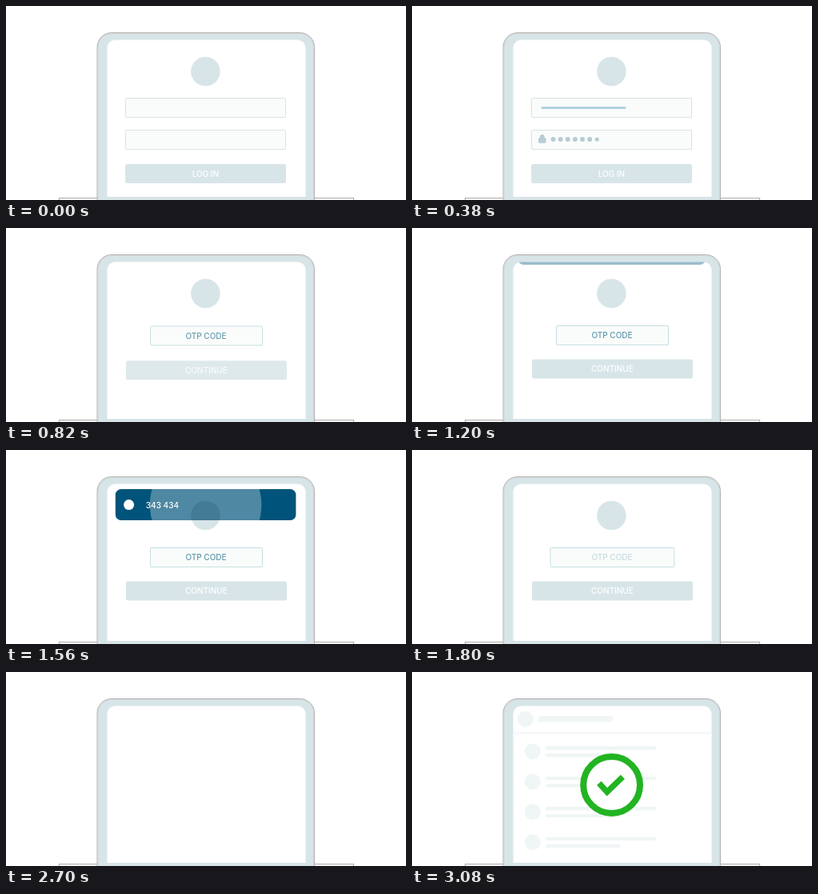
Recreate the animation shown at these times as an HTML page with a canvas. Size 500 by 243 pixels, loop 3260 ms.

```html
<!DOCTYPE html>
<html lang="en">
<head>
<meta charset="utf-8">
<title>Login flow</title>
<style>
html, body { margin: 0; width: 100%; height: 100%; overflow: hidden; background: #fff; }
canvas { display: block; width: 500px; height: 243px; }
</style>
</head>
<body>
<canvas id="stage"></canvas>
<script>
const LOOP = 3260, W = 500, H = 243, CX = 249.8;
const PALE = '#d8e5e8', BLUE = '#0070a6', NAVY = '#00537a', GREEN = '#22b422', GHOST = '#f0f5f6';
const canvas = document.getElementById('stage');
const ctx = canvas.getContext('2d');
const dpr = window.devicePixelRatio || 1;
canvas.width = W * dpr;
canvas.height = H * dpr;

const span = (t, from, to) => Math.min(1, Math.max(0, (t - from) / (to - from)));
const mix = (a, b, k) => a + (b - a) * k;
const easeIn = k => k * k;
const easeOut = k => 1 - (1 - k) ** 3;
const easeBoth = k => k * k * (3 - 2 * k);

function layer(alpha, dy, draw) {
  if (alpha <= 0) return;
  ctx.save();
  ctx.globalAlpha *= alpha;
  ctx.translate(0, dy);
  draw();
  ctx.restore();
}

function box(x, y, w, h, r, fill, stroke) {
  ctx.beginPath();
  ctx.roundRect(x, y, w, h, r);
  if (fill) { ctx.fillStyle = fill; ctx.fill(); }
  if (stroke) { ctx.strokeStyle = stroke; ctx.lineWidth = 1; ctx.stroke(); }
}

function disc(x, y, r, fill) {
  ctx.beginPath();
  ctx.arc(x, y, r, 0, Math.PI * 2);
  ctx.fillStyle = fill;
  ctx.fill();
}

function label(str, x, y, color, { size = 10, weight = 500, align = 'center' } = {}) {
  ctx.font = `${weight} ${size}px Inter, Roboto, sans-serif`;
  ctx.textAlign = align;
  ctx.fillStyle = color;
  ctx.fillText(str, x, y);
}

// Expanding touch highlight, clipped to the pressed shape
function ripple(t, start, x, y, w, h, r) {
  const age = t - start;
  if (age <= 0 || age >= 340) return;
  const alpha = 0.31 * (1 - span(age, 180, 340));
  ctx.save();
  ctx.beginPath();
  ctx.roundRect(x, y, w, h, r);
  ctx.clip();
  const k = 1 - (1 - span(age, 0, 220)) ** 2;
  ctx.globalAlpha *= alpha;
  disc(x + w / 2, y + h / 2, w * 0.52 * k, '#fff');
  ctx.restore();
}

function button(str, x, y, active) {
  box(x, y, 201, 24, 2.5, PALE);
  layer(active, 0, () => box(x, y, 201, 24, 2.5, BLUE));
  label(str, x + 100.4, y + 15.8, '#fff');
}

function padlock(x, y, color) {
  box(x, y + 4, 9.5, 6.8, 1.5, color);
  box(x + 1.8, y, 5.9, 7, 3, color);
}

function laptop() {
  ctx.beginPath();
  ctx.moveTo(66.5, 243);
  ctx.lineTo(66.5, 240.7);
  ctx.lineTo(114, 240.7);
  ctx.moveTo(386, 240.7);
  ctx.lineTo(434.5, 240.7);
  ctx.lineTo(434.5, 243);
  ctx.strokeStyle = '#b9b2b1';
  ctx.lineWidth = 1.2;
  ctx.stroke();
  ctx.fillStyle = '#edf0f0';
  ctx.fillRect(67, 241.4, 47, 1);
  ctx.fillRect(386, 241.4, 48, 1);

  box(114, 33.5, 271.5, 240, 18, PALE, '#b7b0af');
  box(115.2, 34.8, 269.1, 240, 17, null, '#d0d9db');
  box(126.5, 42.5, 248, 196.5, [10, 10, 0, 0], '#fff');
}

function loginForm(t) {
  if (t >= 800) return;
  const exit = (delay, draw) => {
    const k = span(t, 560 + delay, 727 + delay);
    layer(1 - 1.25 * k, 17 * easeIn(k), draw);
  };
  exit(60, () => {
    box(149.5, 115.5, 200, 24, 1.5, '#fafcfb', '#d5e4e6');
    const k = easeBoth(span(t, 10, 200));
    if (k > 0) box(161.5, 126, 106 * k, 3, Math.min(1.5, 53 * k), '#b0d1de');
  });
  exit(30, () => {
    box(149.5, 155.5, 200, 24, 1.5, '#fafcfb', '#d5e4e6');
    layer(span(t, 190, 230), 0, () => padlock(158, 161, '#b7ccd3'));
    for (let i = 0; i < 8; i++) {
      const k = span(t, 210 + i * 24, 240 + i * 24);
      if (k > 0) disc(176.5 + i * 9.12, 167, 3 * k, '#b7ccd3');
    }
  });
  exit(0, () => button('LOG IN', 149, 198, easeBoth(span(t, 420, 540))));
}

function codeForm(t) {
  if (t < 740 || t >= 2700) return;
  const out = span(t, 2620, 2700);
  const show = (delay, draw) => {
    const k = easeOut(span(t, 750 + delay, 860 + delay));
    layer(k * (1 - out), 10 * (1 - k) + 13 * out, draw);
  };
  show(0, () => {
    const k = easeBoth(span(t, 1760, 1880));
    const left = mix(180.5, 151.5, k), right = mix(320.5, 348.8, k);
    box(left, 122.5, right - left, 24, 1.5, '#fafcfb', '#c5dee1');
    layer(1 - span(t, 1760, 1820), 0, () => label('OTP CODE', 250, 138.2, '#5f97ab'));
    layer(span(t, 1840, 1920), 0, () =>
      label('343 434', 159, 138.2, '#111', { size: 10.4, weight: 600, align: 'left' }));
  });
  show(20, () => {
    button('CONTINUE', 150, 164.6, easeBoth(span(t, 1840, 1940)));
    ripple(t, 2120, 150, 164.6, 201, 24, 2.5);
  });
}

function notice(t) {
  if (t < 1180 || t >= 1810) return;
  const k = t < 1500 ? easeOut(span(t, 1178, 1320)) : 1 - span(t, 1670, 1810) ** 3;
  const s = mix(1.067, 1, k);
  ctx.save();
  ctx.globalAlpha = k;
  ctx.translate(249.6, mix(-2.3, 68.6, k));
  ctx.scale(s, s);
  box(-112.8, -19.5, 225.6, 39, 7, NAVY);
  ripple(t, 1480, -112.8, -19.5, 225.6, 39, 7);
  disc(-96, 0, 6.5, '#fff');
  label('343 434', -74.8, 3.9, '#fff', { weight: 500, align: 'left' });
  ctx.restore();
}

function avatar(t) {
  ctx.save();
  ctx.globalCompositeOperation = 'multiply';
  layer(1 - span(t, 2620, 2700), 0, () => disc(249.4, 82, 18.3, PALE));
  ctx.restore();
}

function inbox(t) {
  if (t < 2780) return;
  const head = easeOut(span(t, 2770, 2900));
  layer(head, -8 * (1 - head), () => {
    const shade = ctx.createLinearGradient(0, 74, 0, 80);
    shade.addColorStop(0, '#f0f4f5');
    shade.addColorStop(1, '#fff');
    ctx.fillStyle = shade;
    ctx.fillRect(126, 75, 249, 5);
    disc(141.8, 59, 10, GHOST);
    box(158, 55.2, 93, 7.2, 3, GHOST);
  });
  for (let i = 0; i < 4; i++) {
    const k = easeOut(span(t, 2800 + i * 30, 2920 + i * 30));
    layer(k, 8 * (1 - k), () => {
      const y = 99.5 + i * 37.9;
      disc(150.8, y, 10, GHOST);
      box(167, y - 6.5, 138, 4.4, 2, GHOST);
      box(167, y + 2.6, 93, 4.4, 2, GHOST);
    });
  }
}

function success(t) {
  const k = span(t, 2880, 3080);
  if (k <= 0) return;
  const u = k - 1;
  const s = 1 + 2.4 * u ** 3 + 1.4 * u ** 2;
  ctx.save();
  ctx.globalAlpha = span(k, 0, 0.4);
  ctx.translate(249.6, 141.5);
  ctx.scale(s, s);
  disc(0, 0, 36, '#fff');
  ctx.strokeStyle = GREEN;
  ctx.lineWidth = 8;
  ctx.beginPath();
  ctx.arc(0, 0, 35.4, 0, Math.PI * 2);
  ctx.stroke();
  ctx.lineWidth = 7.4;
  ctx.beginPath();
  ctx.moveTo(-15.8, -2.2);
  ctx.lineTo(-5.8, 8.8);
  ctx.lineTo(13.8, -10.2);
  ctx.stroke();
  ctx.restore();
}

function render(t) {
  ctx.setTransform(dpr, 0, 0, dpr, 0, 0);
  ctx.fillStyle = '#fff';
  ctx.fillRect(0, 0, W, H);
  laptop();
  ctx.save();
  ctx.beginPath();
  ctx.roundRect(126.5, 42.5, 248, 196.5, [10, 10, 0, 0]);
  ctx.clip();
  loginForm(t);
  codeForm(t);
  notice(t);
  avatar(t);
  inbox(t);
  success(t);
  ctx.restore();
}

let start;
function tick(now) {
  start ??= now;
  render((now - start) % LOOP);
  requestAnimationFrame(tick);
}
render(0);
requestAnimationFrame(tick);
</script>
</body>
</html>
```
